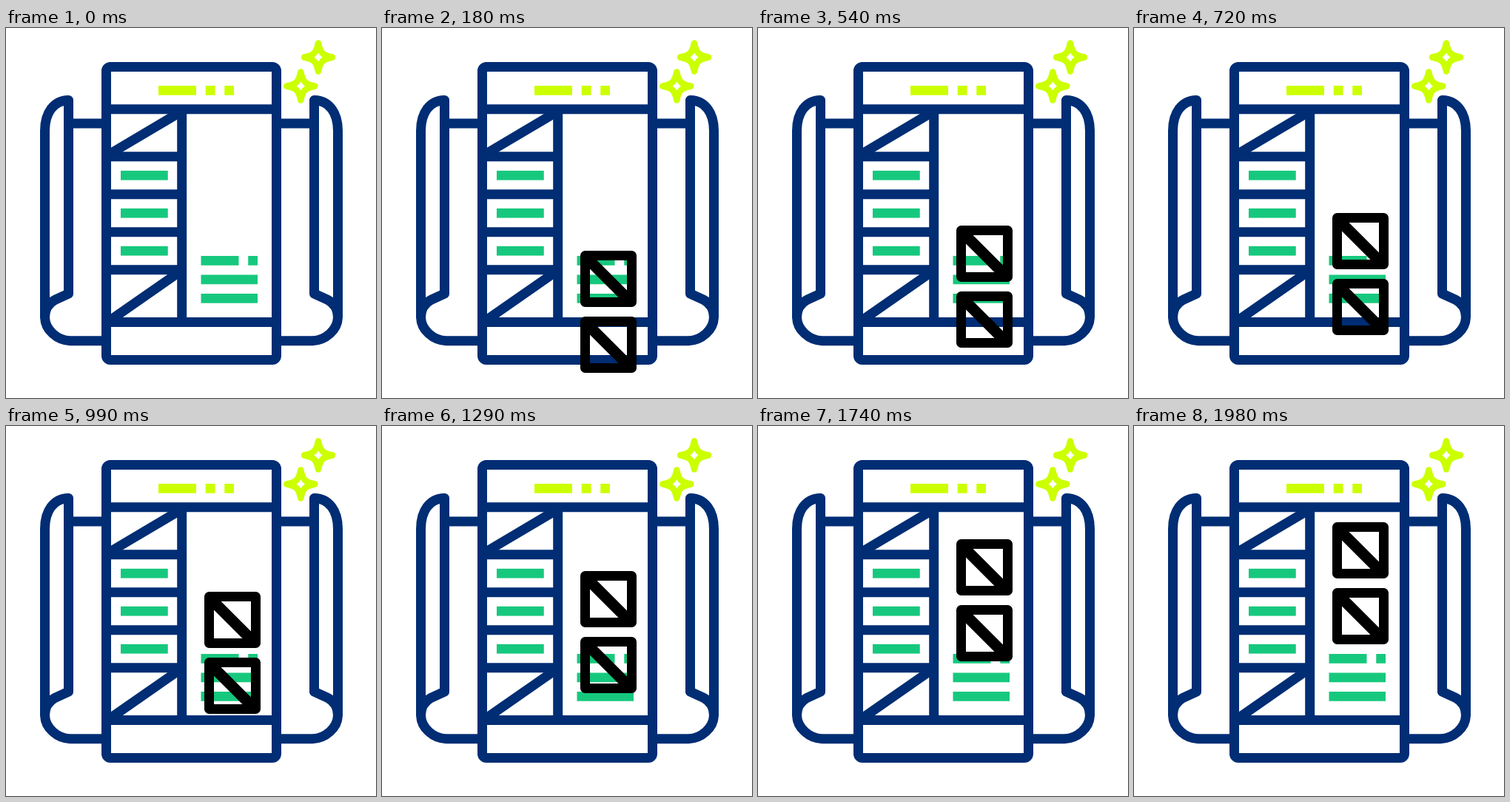
An HTML page with a canvas for the animation above (4.78 s loop, 500 px wide and 500 px high).

```html
<!DOCTYPE html>
<html lang="en">
<head>
<meta charset="utf-8">
<title>Banner layout</title>
<style>
  html, body { margin: 0; width: 100%; height: 100%; overflow: hidden; background: #fff; }
  canvas { display: block; width: 500px; height: 500px; }
</style>
</head>
<body>
<canvas id="stage" width="500" height="500"></canvas>
<script>
const ctx = document.getElementById('stage').getContext('2d');
const NAVY = '#002d74', GREEN = '#16c87d', LIME = '#ccff00', BLACK = '#000';
const UNIT = 12.75; // grid module of the drawing
const STROKE = 13;
const LOOP = 4780, STEP = 30, ARRIVE = 1980;
const SPEED = 0.09515; // px per ms
const REST_Y = 130, GAP = 89;

const scroll = new Path2D(
  'M130 129H84.5M84.5 97.5V359L66 367.5Q52.5 375 52.5 391' +
  'C53 408 69 422 87 422.8H130' +
  'M84.5 97.5C64 98 52.5 115 52.5 139V391');

const star = new Path2D();
star.moveTo(0, -19);
for (let i = 0; i < 4; i++) {
  const turn = new DOMMatrix().rotate(90 * i);
  const at = (x, y) => turn.transformPoint({ x, y });
  const a = at(2.5, -6), b = at(6, -2.5), tip = at(19, 0);
  star.bezierCurveTo(a.x, a.y, b.x, b.y, tip.x, tip.y);
}
star.closePath();

function line(x1, y1, x2, y2, width = STROKE) {
  ctx.lineWidth = width;
  ctx.beginPath();
  ctx.moveTo(x1, y1);
  ctx.lineTo(x2, y2);
  ctx.stroke();
}

// A row of bars, lengths in units, one unit apart.
function bars(color, x, y, ...lengths) {
  ctx.fillStyle = color;
  for (const n of lengths) {
    ctx.fillRect(x, y, n * UNIT, UNIT);
    x += (n + 1) * UNIT;
  }
}

function drawScrolls() {
  ctx.lineJoin = ctx.lineCap = 'round';
  ctx.strokeStyle = NAVY;
  ctx.lineWidth = STROKE;
  for (const side of [1, -1]) {
    ctx.save();
    ctx.translate(250.5, 0);
    ctx.scale(side, 1);
    ctx.translate(-250.5, 0);
    ctx.stroke(scroll);
    ctx.restore();
  }
}

function drawPanel() {
  ctx.fillStyle = ctx.strokeStyle = NAVY;
  ctx.lineCap = 'butt';
  ctx.beginPath();
  ctx.roundRect(129, 46, 243, 409, 12);
  ctx.rect(142, 59, 217, 383);
  ctx.fill('evenodd');

  line(136, 109.8, 365, 109.8);
  line(136, 397.5, 365, 397.5);
  line(237.7, 110, 237.7, 397);
  line(138, 171.5, 234, 114.7);
  line(138, 396.8, 234, 330);
  for (let i = 0; i < 4; i++) {
    const y = 173.7 + i * 4 * UNIT;
    line(136, y, 237, y);
    if (i < 3) bars(GREEN, 155, y + 1.5 * UNIT, 5);
  }

  bars(LIME, 206, 78, 4, 1, 1);
  bars(GREEN, 263.5, 308, 4, 1);
  for (let i = 1; i < 3; i++) bars(GREEN, 263.5, 308 + i * 2 * UNIT, 6);
}

function drawStar(x, y) {
  ctx.save();
  ctx.translate(x, y);
  ctx.strokeStyle = LIME;
  ctx.lineWidth = 8.5;
  ctx.stroke(star);
  ctx.restore();
}

function drawBox(y) {
  ctx.strokeStyle = BLACK;
  ctx.lineWidth = STROKE;
  ctx.strokeRect(274.5, y + 6.5, 63, 63);
  line(275, y + 8, 336, y + 69, 15);
}

function draw(now) {
  const t = Math.floor((now % LOOP) / STEP) * STEP;
  ctx.fillStyle = '#fff';
  ctx.fillRect(0, 0, 500, 500);
  drawScrolls();
  drawPanel();
  drawStar(422, 39.5);
  drawStar(398.3, 78.5);
  if (t >= STEP) {
    const y = Math.round(REST_Y + Math.max(0, ARRIVE - t) * SPEED);
    drawBox(y);
    drawBox(y + GAP);
  }
}

const start = performance.now();
function frame() {
  draw(performance.now() - start);
  requestAnimationFrame(frame);
}
frame();
</script>
</body>
</html>
```
